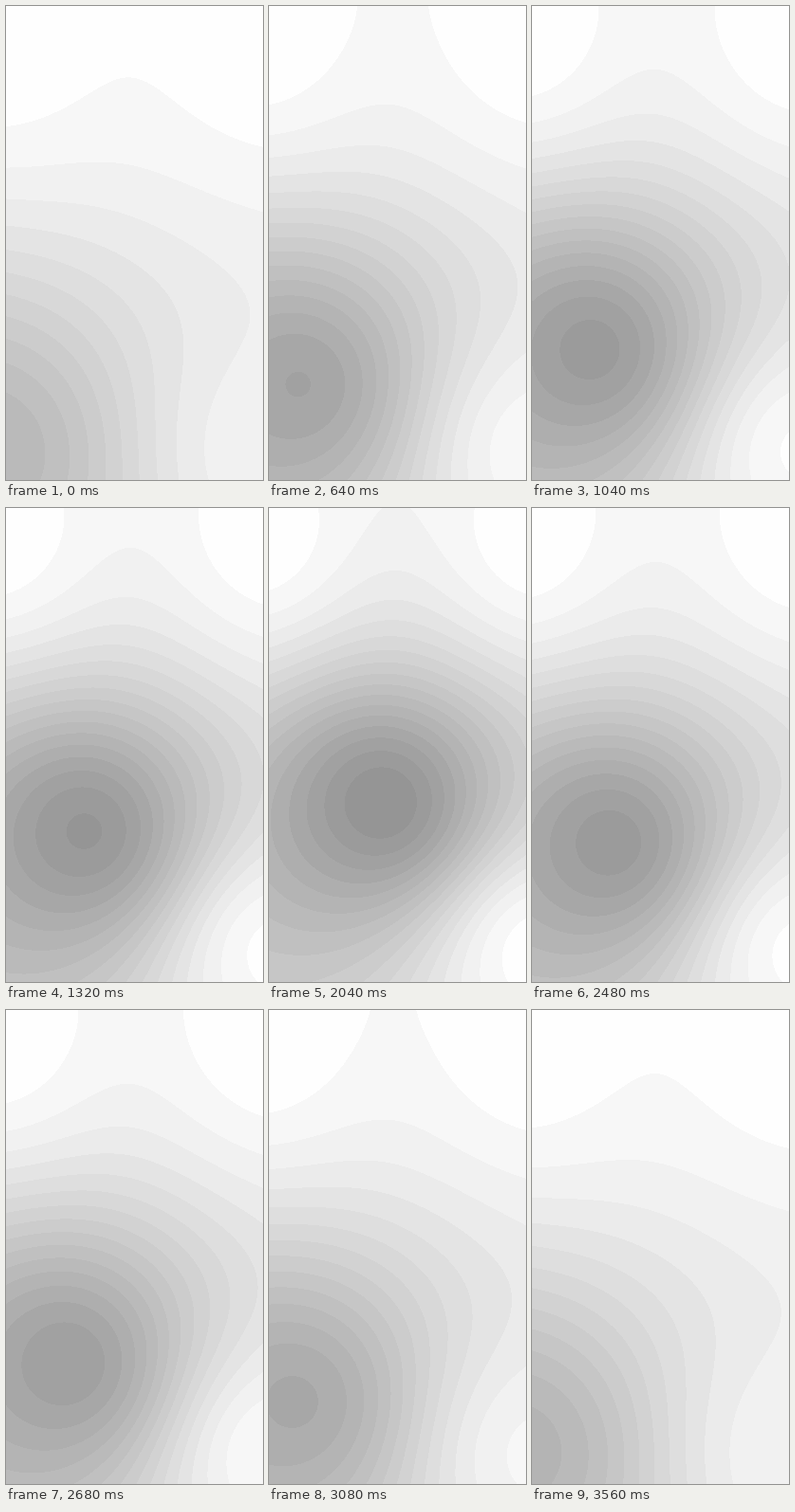
An HTML page with a canvas that plays this animation: 271x500 px, repeating every 3.6 s.

```html
<!DOCTYPE html>
<html lang="en">
<head>
<meta charset="utf-8">
<title>Grey gradient</title>
<style>
  html, body { margin: 0; width: 100%; height: 100%; overflow: hidden; background: #fefefe; }
  canvas { display: block; width: 100vw; height: 100vh; }
</style>
</head>
<body>
<canvas id="stage" width="271" height="500"></canvas>
<script>
const W = 271, H = 500, LOOP = 3600;
const ctx = document.getElementById("stage").getContext("2d");
const img = ctx.createImageData(W, H);
const px = new Uint32Array(img.data.buffer);

// The picture advances in uneven steps.
const steps = [0, 240, 440, 640, 840, 1040, 1320, 1680, 2040, 2280, 2480, 2680, 2880, 3080, 3320, 3560];

// Dark point: position, darkness; tint: darkness of the lower right corner.
const out = {
  t: [0, 640, 1320, 2040],
  x: [-21, 31, 83, 120],
  y: [469, 399, 341, 311],
  dark: [72, 91, 104, 108.5],
  tint: [12, 6.3, 2.8, 0.9]
};
const back = {
  t: [2040, 2480, 3080, 3560],
  x: [120, 83, 26, -17],
  y: [311, 353, 413, 465],
  dark: [108.5, 100.5, 86, 76],
  tint: [0.9, 2.6, 9.5, 11.1]
};

// Smooth curve through a few keys (Lagrange).
function curve(ts, vs, t) {
  let sum = 0;
  for (let i = 0; i < ts.length; i++) {
    let p = vs[i];
    for (let j = 0; j < ts.length; j++) {
      if (j !== i) p *= (t - ts[j]) / (ts[i] - ts[j]);
    }
    sum += p;
  }
  return sum;
}

// Darkness is split into flat bands.
const FIRST = 5.2, BAND = 6.1;
function shade(d) {
  if (d < FIRST) return 254;
  const k = Math.floor((d - FIRST) / BAND);
  return Math.round(255 - FIRST - BAND * (k + 0.5));
}

function weight(x, y, cx, cy) {
  const dx = x - cx, dy = y - cy;
  return 1 / (dx * dx + dy * dy + 1e-3);
}

// Inverse-distance blend of three light corners and one dark point.
function draw(t) {
  const leg = t < 2040 ? out : back;
  const at = name => curve(leg.t, leg[name], t);
  const cx = at("x"), cy = at("y"), dark = at("dark"), tint = at("tint");
  let n = 0;
  for (let j = 0; j < H; j++) {
    const y = j + 0.5;
    for (let i = 0; i < W; i++) {
      const x = i + 0.5;
      const wd = weight(x, y, cx, cy);
      const wc = weight(x, y, 288, 469);
      const sum = wd + wc + weight(x, y, -17, 31) + weight(x, y, 288, 31);
      const v = shade((wd * dark + wc * tint) / sum);
      px[n++] = 0xff000000 | v * 0x010101;
    }
  }
  ctx.putImageData(img, 0, 0);
}

let shown = -1;
function frame() {
  const t = performance.now() % LOOP;
  let s = steps.length - 1;
  while (steps[s] > t) s--;
  if (s !== shown) {
    shown = s;
    draw(steps[s]);
  }
  requestAnimationFrame(frame);
}
frame();
</script>
</body>
</html>
```
